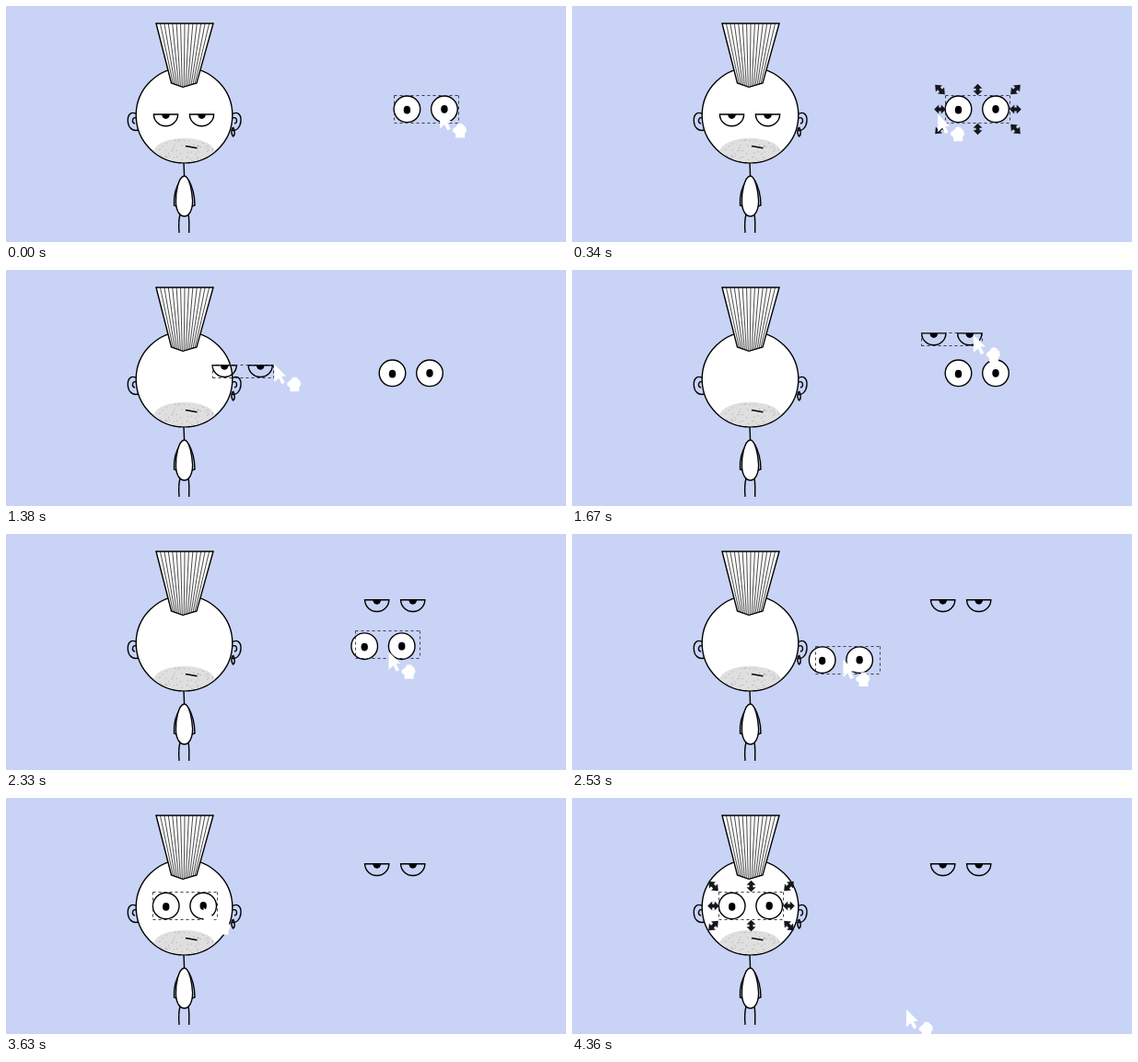
An HTML page with a canvas for the animation above (4390 ms loop, 608 by 257 pixels).

```html
<!DOCTYPE html>
<html lang="en">
<head>
<meta charset="utf-8">
<title>Swapping eyes</title>
<style>
html, body { margin: 0; width: 100%; height: 100%; overflow: hidden; background: #c9d3f5; }
canvas { display: block; }
</style>
</head>
<body>
<canvas id="stage" width="608" height="257"></canvas>
<script>
const ctx = document.getElementById('stage').getContext('2d');
const LOOP = 4390;
const LEAD = 30; // the pointer runs this many ms ahead of what it drags
const INK = '#000';
const BACK = '#c9d3f5';

function ease(t, from, to) {
  const u = Math.min(1, Math.max(0, (t - from) / (to - from)));
  return u * u * (3 - 2 * u);
}

// Each leg: start time, end time, destination, optional bow in y
function travel(t, [x, y], ...legs) {
  for (const [from, to, tx, ty, bow = 0] of legs) {
    const s = ease(t, from, to);
    x += (tx - x) * s;
    y += (ty - y) * s + bow * Math.sin(Math.PI * s);
  }
  return [x, y];
}

// Center of the left round eye
const roundAt = t => travel(t, [441, 112.3],
  [-60, 123, 419.5, 112.3], [2207, 2757, 185.7, 118.3, 23], [2757, 3070, 173.7, 117.5]);

// Middle of the left half eye's lid
const halfAt = t => travel(t, [173.5, 118],
  [1190, 1740, 402.7, 66.7], [1740, 1800, 402.7, 71.7]);

function gripRound(t) {
  const [x, y] = roundAt(t + LEAD);
  return [x + 40.8, y + 1.8];
}

function gripHalf(t) {
  const [x, y] = halfAt(t + LEAD);
  return [x + 36.5, y + 3];
}

function cursorAt(t) {
  if (t < 123) return gripRound(t);
  if (t < 1190) return travel(t, gripRound(123), [123, 795, 205, 129], [826, 1190, ...gripHalf(1100)]);
  if (t < 1800) return gripHalf(t);
  if (t < 2180) return travel(t, gripHalf(1800), [1800, 2180, ...gripRound(2100)]);
  if (t < 3690) return gripRound(t);
  return travel(t, gripRound(3690), [3690, 4150, 306, 237], [4150, 4365, 363, 230]);
}

function draw(path, fill, stroke, width) {
  if (fill) { ctx.fillStyle = fill; ctx.fill(path); }
  if (stroke) { ctx.strokeStyle = stroke; ctx.lineWidth = width || 1.4; ctx.stroke(path); }
}

function shape(d, fill, stroke, width) {
  draw(new Path2D(d), fill, stroke, width);
}

function oval(x, y, rx, ry, fill, stroke, from = 0, to = Math.PI * 2) {
  const p = new Path2D();
  p.ellipse(x, y, rx, ry, 0, from, to);
  p.closePath();
  draw(p, fill, stroke);
}

function seeded(seed) {
  return () => (seed = seed * 16807 % 2147483647) / 2147483647;
}

function beard() {
  ctx.save();
  ctx.beginPath();
  ctx.ellipse(193.5, 119, 51.6, 51.2, 0, 0, Math.PI * 2);
  ctx.clip();
  shape('M160 159C164 139 223 139 227 159L222 172H164Z', '#dfdfdf');
  const rnd = seeded(41);
  ctx.fillStyle = '#999';
  for (let i = 0; i < 75; i++) {
    const x = 162 + rnd() * 63, y = 145 + rnd() * 26;
    if (Math.hypot((x - 193.5) / 32, (y - 159) / 14) < 1) ctx.fillRect(x, y, 0.9, 0.9);
  }
  ctx.restore();
}

function mohawk() {
  shape('M163 19H225L207 84L192 88.3L179.5 84Z', '#fff', INK);
  const stripes = 14;
  for (let i = 1; i < stripes; i++) {
    const u = i / stripes;
    const y = 84 + 4.3 * (1 - Math.abs(2 * u - 1));
    shape(`M${163 + 62 * u} 19L${179.5 + 27.5 * u} ${y}`, null, '#111', 0.75);
  }
}

function figure() {
  shape('M193 171L193.6 186M190 189C185 196 182 207 182.5 217L185 218M198 189C202 196 205 207 205 217L202 218', null, INK);
  shape('M189 227C187 234 187.5 241 188 247M198 227C199.3 234 198.6 241 198.7 247', null, INK);
  shape('M193.6 185C187 186 184 204 184.4 214C185 224 189 229 193.6 229C198.5 229 202.6 223 202.6 212C202 202 199.5 186 193.6 185Z', '#fff', INK);
  shape('M143 118C136 114 132 118 132.3 125C132.5 132 137 137 144 135M142 122C137 120 136 127 140 128', null, INK);
  shape('M245 118C251 114 255.5 118 255 125C254.5 132 250 137 245 135M246 122C251 120 252 127 248 128', null, INK);
  oval(193.5, 119, 52.3, 51.9, '#fff', INK);
  beard();
  shape('M195 152.5L207.5 154.7', null, INK, 1.5);
  shape('M246.5 132C244.5 135 244.5 139 246.5 142C249 141 248.5 135 246.5 132', null, INK);
  mohawk();
}

function halfEyes([x, y]) {
  for (const cx of [x, x + 39]) {
    oval(cx, y, 13.1, 12.8, null, INK, 0, Math.PI);
    oval(cx, y, 4.3, 5, INK, null, 0, Math.PI);
  }
}

function roundEyes([x, y]) {
  oval(x, y, 14.3, 14.3, '#fff', INK);
  oval(x + 40.5, y, 14.3, 14.3, '#fff', INK);
  oval(x, y + 0.9, 3.7, 4.4, INK);
  oval(x + 40.5, y, 3.7, 4.4, INK);
}

function handle(x, y, angle, size) {
  ctx.save();
  ctx.translate(x, y);
  ctx.rotate(angle);
  ctx.scale(size, 1);
  shape('M-6 0L-1.2 -5V-2H1.2V-5L6 0L1.2 5V2H-1.2V5Z', '#15171c');
  ctx.restore();
}

function selection(left, top, w, h, handles) {
  const x = Math.round(left) + 0.5, y = Math.round(top) + 0.5;
  ctx.setLineDash([3, 3]);
  for (const side of [`h${w}`, `v${h}`, `m0 ${h}h${w}`, `m${w} 0v${h}`]) {
    shape(`M${x} ${y}${side}`, null, '#2b2e3a', 0.9);
  }
  ctx.setLineDash([]);
  if (!handles) return;
  const cx = x + w / 2, cy = y + h / 2;
  for (let i = -1; i <= 1; i++) {
    for (let j = -1; j <= 1; j++) {
      if (!i && !j) continue;
      const angle = Math.atan2(j, i);
      handle(cx + i * (w / 2 + 6), cy + j * (h / 2 + 6.5), angle, i && j ? 1.25 : 1.05);
    }
  }
}

function cursor([x, y]) {
  ctx.save();
  ctx.translate(x, y);
  shape('M0 0L13 13H8L11.5 20L8 21.5L5 15L0 19.5Z', '#fff');
  shape('M14 20L18 17L20 14H24L28 18L29 22L27 25V29.5H17V25L14 23Z', '#fff');
  ctx.restore();
}

function render(t) {
  ctx.fillStyle = BACK;
  ctx.fillRect(0, 0, 608, 257);
  figure();
  halfEyes(halfAt(t));
  roundEyes(roundAt(t));
  if (t >= 1150 && t < 2200) {
    const [x, y] = halfAt(t);
    selection(x - 13.7, y - 0.9, 66, 14, t > 1830);
  } else {
    const [x, y] = roundAt(t > 2200 ? t - 11 : t); // the frame trails the eyes
    selection(x - 14.8, y - 15.3, 70, 30, (t > 130 && t < 1150) || t > 3660);
  }
  cursor(cursorAt(t));
}

function tick() {
  render(performance.now() % LOOP);
  requestAnimationFrame(tick);
}
tick();
</script>
</body>
</html>
```
